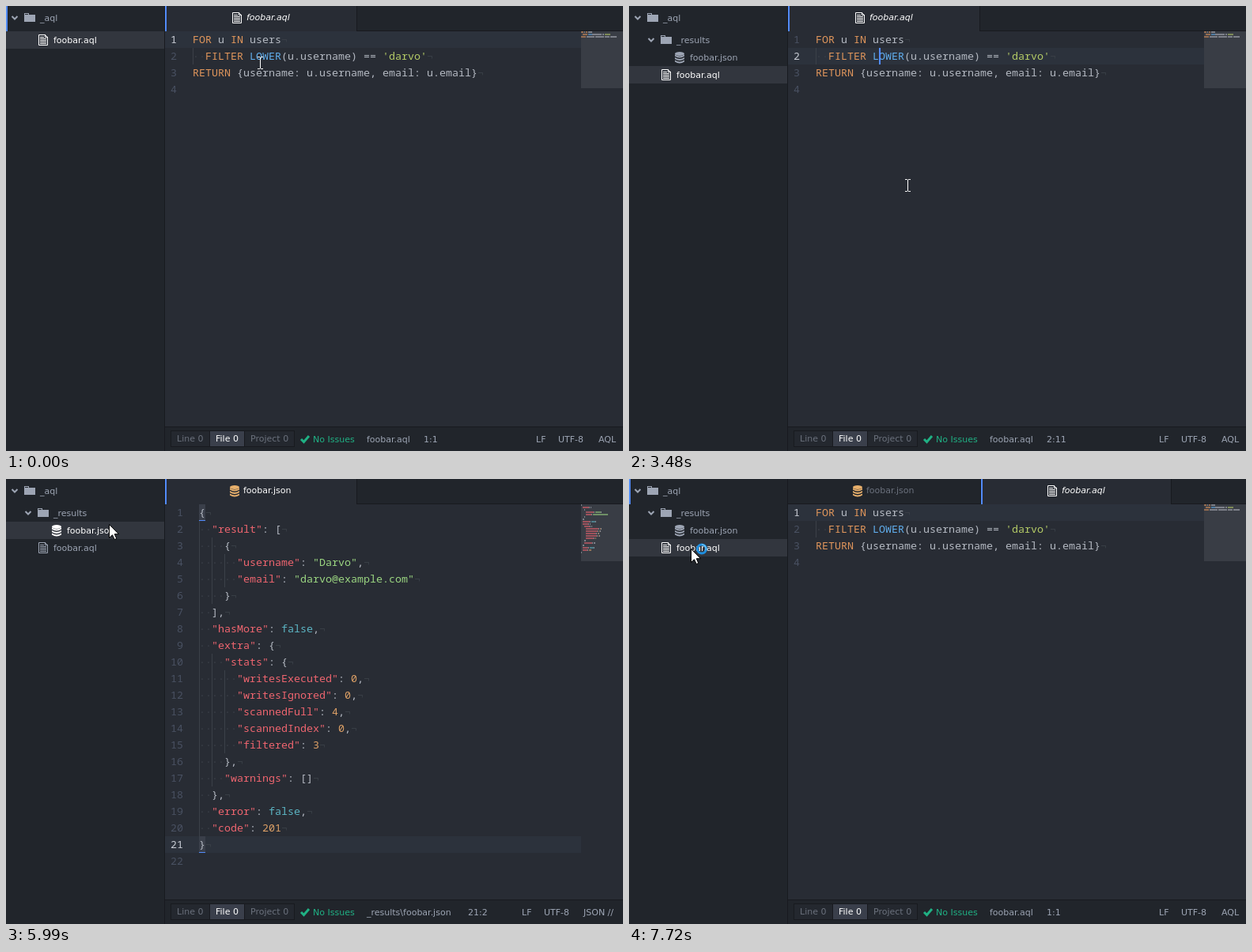
Recreate the animation shown at these times as an HTML page with a canvas. Size 780 by 563 pixels, loop 8 s.

```html
<!DOCTYPE html>
<html lang="en">
<head>
<meta charset="utf-8">
<title>Query editor</title>
<style>
html, body { margin: 0; width: 100%; height: 100%; overflow: hidden; background: #21252b; }
canvas { display: block; }
</style>
</head>
<body>
<canvas id="stage" width="780" height="563"></canvas>
<script>
const g = document.getElementById('stage').getContext('2d');
const LOOP = 8000, ROW = 21, CHAR = 8, TOP = 32;
const MONO = '13.33px "Noto Sans Mono", monospace';
const UI = '11px "DejaVu Sans", sans-serif';
const C = {
  editor: '#282c34', panel: '#21252b', border: '#181a1f', line: '#2c323c',
  select: '#32363e', map: '#393d45', text: '#b4b9c2', ui: '#9da5b4', dim: '#6b717d',
  white: '#ffffff', hidden: '#3b4048', number: '#495162', blue: '#528bff',
  green: '#20b184', amber: '#e8b06c'
};

const aql = {
  x: 236, name: 'foobar.aql', grammar: 'AQL',
  lines: [
    'FOR u IN users',
    "  FILTER LOWER(u.username) == 'darvo'",
    'RETURN {username: u.username, email: u.email}',
    ''
  ],
  rules: [[/^'[^']*'/, '#b4cb66'], [/^(FOR|IN|FILTER|RETURN)\b/, '#e0965c'], [/^LOWER/, '#61afef'], [/^[\w.]+/, C.text]]
};
const json = {
  x: 244, name: '_results\\foobar.json', grammar: 'JSON //',
  lines: (JSON.stringify({
    result: [{ username: 'Darvo', email: 'darvo@example.com' }],
    hasMore: false,
    extra: {
      stats: { writesExecuted: 0, writesIgnored: 0, scannedFull: 4, scannedIndex: 0, filtered: 3 },
      warnings: []
    },
    error: false,
    code: 201
  }, null, 2) + '\n').split('\n'),
  rules: [[/^"[^"]*"(?=:)/, '#ee656f'], [/^"[^"]*"/, '#9bd681'], [/^\d+/, '#dda066'], [/^false/, '#5cb5c4']]
};

function tokenize(line, rules) {
  const out = [];
  for (let col = 0; col < line.length;) {
    const rest = line.slice(col);
    let text = rest[0], color = C.text;
    for (const [re, c] of rules) {
      const m = rest.match(re);
      if (m) { text = m[0]; color = c; break; }
    }
    if (text !== ' ') out.push({ col, text, color });
    col += text.length;
  }
  return out;
}
for (const doc of [aql, json]) doc.tokens = doc.lines.map(l => tokenize(l, doc.rules));

// Time windows in which the text caret is lit
const caretOn = [
  [770, 1200], [1600, 2010], [2440, 2840], [3220, 3600], [3750, 4160], [4530, 4930],
  [5330, 5730], [6110, 6500], [6900, 7170]
];
// Pointer stops: time, x, y
const pointer = [
  [0, 321, 72], [500, 321, 69], [620, 321, 66], [920, 334, 128], [1050, 345, 197], [1200, 352, 227],
  [5600, 336, 184], [5730, 280, 122], [5870, 188, 80], [5990, 130, 57], [6110, 120, 42],
  [6230, 108, 48], [6360, 97, 61], [6500, 90, 70], [6620, 84, 78], [6740, 80, 84], [6900, 78, 88]
];
// Last value whose start time has passed
const at = (t, steps) => steps.filter(s => s[0] <= t).pop();

function rect(x, y, w, h, color) {
  g.fillStyle = color;
  g.fillRect(x, y, w, h);
}
function text(s, x, y, color, font = UI) {
  g.font = font;
  g.fillStyle = color;
  g.fillText(s, x, y);
}
function path(points, color, width, close) {
  g.beginPath();
  points.forEach(([x, y]) => g.lineTo(x, y));
  if (close) g.closePath();
  if (width) {
    g.strokeStyle = color;
    g.lineWidth = width;
    g.stroke();
  } else {
    g.fillStyle = color;
    g.fill();
  }
}

function chevron(x, y) {
  path([[x, y], [x + 3.5, y + 3.5], [x + 7, y]], C.ui, 2);
}
function folder(x, y) {
  rect(x, y, 6, 3, C.ui);
  rect(x, y + 2, 14, 9, C.ui);
  rect(x + 1, y + 1, 4, 1, C.panel);
}
function page(x, y, color) {
  path([[x + .5, y + .5], [x + 8.5, y + .5], [x + 11.5, y + 3.5], [x + 11.5, y + 13.5], [x + .5, y + 13.5]], color, 1, true);
  path([[x + 8.5, y], [x + 8.5, y + 3.5], [x + 12, y + 3.5]], color, 1);
  rect(x + 2, y + 3, 5, 1, color);
  for (let i = 5; i < 12; i += 2) rect(x + 2, y + i, 8, 1, color);
}
function database(x, y, color) {
  g.fillStyle = color;
  g.beginPath();
  g.ellipse(x + 6.5, y + 2.5, 6, 2.5, 0, 0, Math.PI * 2);
  g.fill();
  for (let i = 0; i < 3; i++) {
    const top = y + 3.5 + i * 3.5;
    g.beginPath();
    g.moveTo(x + .5, top);
    g.quadraticCurveTo(x + 6.5, top + 4, x + 12.5, top);
    g.lineTo(x + 12.5, top + 2);
    g.quadraticCurveTo(x + 6.5, top + 6, x + .5, top + 2);
    g.fill();
  }
}

function drawTree(t) {
  rect(0, 0, 200, 563, C.panel);
  const selected = t < 3600 || t >= 7170 ? 'aql' : 'json';
  const hasResults = t >= 3480;
  const aqlY = hasResults ? 76 : 32;
  rect(0, selected === 'aql' ? aqlY : 54, 200, 22, C.select);
  const tone = kind => kind === selected ? C.white : C.ui;

  chevron(7.5, 13);
  folder(23, 9);
  text('_aql', 43, 19, C.ui);
  if (hasResults) {
    chevron(24.5, 41);
    folder(40, 37);
    text('_results', 60, 47, C.ui);
    database(57.5, 58, tone('json'));
    text('foobar.json', 77, 69, tone('json'));
  }
  page(41, aqlY + 4, tone('aql'));
  text('foobar.aql', 60, aqlY + 15, tone('aql'));

  g.globalAlpha = at(t, [[0, 1], [770, .6], [920, .25], [1050, 0], [7170, .5], [7290, 1]])[1];
  rect(0, 0, 2, 32, C.blue);
  g.globalAlpha = 1;
  rect(200, 0, 1, 563, C.border);
}

function drawTabs(t) {
  rect(201, 0, 579, 32, C.panel);
  rect(201, 31, 579, 1, C.border);
  const both = t >= 7440, showJson = t >= 3600;
  const x = both ? 445 : 201;
  const right = both ? 685 : 443;
  rect(x, 0, right - x, 32, C.editor);
  rect(right, 0, 1, 32, C.border);
  if (both) rect(444, 0, 1, 32, C.border);
  if (showJson) {
    database(282.5, 8, C.amber);
    text('foobar.json', 300, 18, both ? C.dim : C.white);
  }
  if (both || !showJson) {
    page(x + (both ? 84 : 85), 8, C.white);
    text('foobar.aql', x + (both ? 102 : 103), 18, C.white, 'italic ' + UI);
  }
  const h = at(t, [[0, 32], [3600, 12], [3750, 31], [3870, 32], [7440, 14], [7570, 31], [7720, 32]])[1];
  rect(x, 0, 2, h, C.blue);
}

function drawMinimap(doc) {
  rect(727, TOP, 53, 72, C.map);
  g.globalAlpha = .55;
  doc.tokens.forEach((row, i) => {
    for (const k of row) rect(727 + k.col, TOP + i * 3, k.text.length, 2, k.color);
  });
  g.globalAlpha = 1;
}

function drawEditor(doc, active, t) {
  rect(201, TOP, 579, 500, C.editor);
  rect(201, TOP + (active - 1) * ROW, 526, ROW, C.line);
  doc.lines.forEach((line, i) => {
    const y = TOP + i * ROW, base = y + 15;
    const n = String(i + 1);
    text(n, doc.x - 20 - n.length * CHAR, base, i + 1 === active ? '#c8ccd4' : C.number, MONO);
    const indent = line.search(/\S|$/);
    for (let c = 0; c < indent; c++) {
      text('·', doc.x + c * CHAR, base, C.hidden, MONO);
      if (c % 2 === 0) rect(doc.x + c * CHAR, y, 1, ROW, C.hidden);
    }
    if (doc === json && (line === '{' || line === '}')) {
      rect(doc.x, y, CHAR, ROW, '#3a3f4a');
      rect(doc.x, y + ROW - 1, CHAR, 1, C.blue);
    }
    for (const k of doc.tokens[i]) text(k.text, doc.x + k.col * CHAR, base, k.color, MONO);
    if (line) text('¬', doc.x + line.length * CHAR, base, C.hidden, MONO);
  });
  if (doc === aql || t >= 3750) drawMinimap(doc);
  if (caretOn.some(([a, b]) => t >= a && t < b)) {
    rect(doc === aql ? 316 : 252, TOP + (active - 1) * ROW, 2, ROW, C.blue);
  }
}

function drawStatus(doc, position) {
  const isJson = doc === json;
  rect(201, 532, 579, 31, C.panel);
  rect(201, 532, 579, 1, C.border);
  rect(208, 537, 157, 21, C.border);
  rect(209, 538, 48, 19, '#24282f');
  rect(258, 538, 43, 19, '#3a3f4b');
  rect(302, 538, 62, 19, '#24282f');
  text('Line 0', 216, 551, C.dim);
  text('File 0', 265, 551, C.white);
  text('Project 0', 309, 551, C.dim);
  path([[373, 548], [376.5, 551.5], [383, 544]], C.green, 3);
  text('No Issues', 388, 552, C.green);
  text(doc.name, 456, 552, C.ui);
  text(position, isJson ? 584 : 528, 552, C.ui);
  text('LF', isJson ? 652 : 670, 552, C.ui);
  text('UTF-8', isJson ? 680 : 698, 552, C.ui);
  text(doc.grammar, isJson ? 730 : 749, 552, C.ui);
}

function drawPointer(t) {
  const [, x, y] = at(t, pointer);
  if (x > 200) {
    rect(x, y - 7, 1, 14, C.white);
    for (const side of [x - 3, x + 1]) {
      rect(side, y - 8, 3, 1, C.white);
      rect(side, y + 7, 3, 1, C.white);
    }
    return;
  }
  const arrow = [[0, 0], [0, 17], [4, 13.3], [6.7, 19], [9.3, 18], [6.8, 12.2], [12, 12.2]]
    .map(([dx, dy]) => [x + .5 + dx, y + .5 + dy]);
  path(arrow, C.white);
  path(arrow, '#000000', 1, true);
  if (t >= 7290) {
    g.lineWidth = 3;
    g.strokeStyle = '#1f8fe0';
    g.beginPath();
    g.arc(92, 88.5, 5.5, 0, Math.PI * 2);
    g.stroke();
    g.lineWidth = 1.5;
    g.strokeStyle = '#6cc4f5';
    g.beginPath();
    g.arc(92, 88.5, 5.5, -1.6, .3);
    g.stroke();
  }
}

function draw(t) {
  const doc = t >= 3600 && t < 7440 ? json : aql;
  const [, row, col] = at(t, [[0, 1, 1], [770, 2, 11], [3600, 1, 1], [3750, 21, 2], [7440, 1, 1]]);
  drawEditor(doc, row, t);
  drawTabs(t);
  drawStatus(doc, row + ':' + col);
  drawTree(t);
  drawPointer(t);
}

const start = performance.now();
function tick() {
  draw((performance.now() - start) % LOOP);
  requestAnimationFrame(tick);
}
tick();
</script>
</body>
</html>
```
